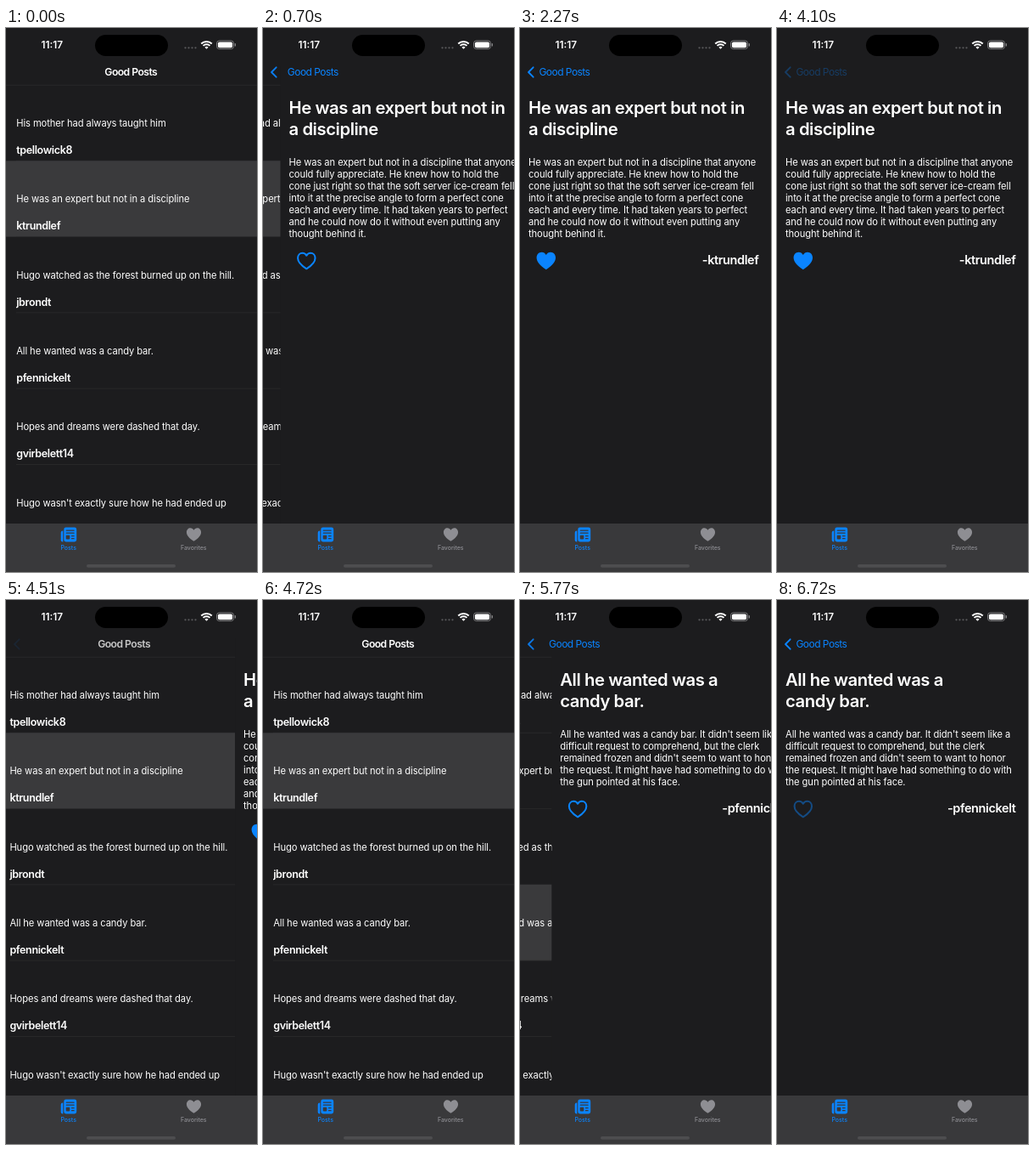
An HTML page that plays this animation: 296 by 640 pixels, repeating every 8000 ms.

```html
<!DOCTYPE html>
<html lang="en">
<head>
<meta charset="utf-8">
<title>Good Posts</title>
<style>
  html, body { margin: 0; width: 100%; height: 100%; overflow: hidden; background: #1c1c1e; }
  svg { display: block; width: 296px; height: 640px; }
  text { font-family: Inter, "Open Sans", sans-serif; fill: #fff; white-space: pre; }
  .body { font-size: 11.2px; letter-spacing: -.088px; }
  .user { font-size: 12.5px; font-weight: 600; letter-spacing: -.35px; }
  .bar { font-size: 12.2px; font-weight: 600; letter-spacing: -.55px; }
  .back { font-size: 12px; letter-spacing: -.53px; fill: #0a84ff; }
  .title { font-size: 20.3px; font-weight: 600; letter-spacing: -.44px; }
  .author { font-size: 14.5px; font-weight: 600; letter-spacing: -.4px; }
  .clock { font-size: 11.8px; font-weight: 600; }
  .tab { font-size: 7px; font-weight: 500; text-anchor: middle; }
  .line { stroke: #2b2b2d; stroke-width: .8; }
</style>
</head>
<body>
<svg id="stage" viewBox="0 0 296 640"></svg>
<script>
const LOOP = 8000, W = 296, BLUE = '#0a84ff', BG = '#1c1c1e', GRAY = '#8e8e93';
const ROW_TOP = 67, ROW_H = 89.3;

// The screen is refreshed only at these times.
const TICKS = [0, 500, 600, 700, 810, 910, 2160, 2270, 4100, 4400, 4510, 4610, 4720,
  5540, 5660, 5770, 5880, 5990, 6720];

const posts = [
  ['His mother had always taught him', 'tpellowick8'],
  ['He was an expert but not in a discipline', 'ktrundlef'],
  ['Hugo watched as the forest burned up on the hill.', 'jbrondt'],
  ['All he wanted was a candy bar.', 'pfennickelt'],
  ['Hopes and dreams were dashed that day.', 'gvirbelett14'],
  ["Hugo wasn't exactly sure how he had ended up", '']
];

const details = [
  {
    title: ['He was an expert but not in', 'a discipline'],
    body: ['He was an expert but not in a discipline that anyone',
      'could fully appreciate. He knew how to hold the',
      'cone just right so that the soft server ice-cream fell',
      'into it at the precise angle to form a perfect cone',
      'each and every time. It had taken years to perfect',
      'and he could now do it without even putting any',
      'thought behind it.'],
    author: posts[1][1]
  },
  {
    title: ['All he wanted was a', 'candy bar.'],
    body: ["All he wanted was a candy bar. It didn't seem like a",
      'difficult request to comprehend, but the clerk',
      "remained frozen and didn't seem to want to honor",
      'the request. It might have had something to do with',
      'the gun pointed at his face.'],
    author: posts[3][1]
  }
];

const HEART = 'M0 10C-7 5.5-11 1-11-3.6C-11-7.3-8.4-10-5.2-10C-3-10-1-8.8 0-6.8' +
  'C1-8.8 3-10 5.2-10C8.4-10 11-7.3 11-3.6C11 1 7 5.5 0 10Z';

const text = (x, y, cls, s, attrs = '') => `<text x="${x}" y="${y}" class="${cls}" ${attrs}>${s}</text>`;
const rect = (x, y, w, h, fill, r = 0, attrs = '') =>
  `<rect x="${x}" y="${y}" width="${w}" height="${h}" fill="${fill}" rx="${r}" ${attrs}/>`;
const lines = (list, x, y, step, cls) => list.map((s, i) => text(x, y + i * step, cls, s)).join('');
const heart = (x, y, scale, attrs) => `<path d="${HEART}" transform="translate(${x} ${y}) scale(${scale})" ${attrs}/>`;
const rule = (x, y) => `<path class="line" d="M${x} ${y}H${W}"/>`;

function arc(r, width) {
  const d = r * Math.SQRT1_2;
  return `<path d="M${236.5 - d} ${24.8 - d}A${r} ${r} 0 0 1 ${236.5 + d} ${24.8 - d}" fill="none" stroke="#fff" stroke-width="${width}"/>`;
}

function row([line, user], i) {
  const y = ROW_TOP + i * ROW_H;
  return rect(0, y, W, ROW_H, '#3a3a3c', 0, `id="row${i}"`) + rule(12, y + ROW_H) +
    text(12.2, y + 49, 'body', line) + text(12.2, y + 81, 'user', user);
}

function detail({ title, body, author }, i) {
  const y = 176 + body.length * 14;
  return `<g id="page${i}">` + lines(title, 10, 101, 24.7, 'title') + lines(body, 10, 162, 14, 'body') +
    heart(30.8, y, .93, `id="open${i}" fill="none" stroke="${BLUE}" stroke-width="2.2" stroke-linejoin="round"`) +
    heart(30.8, y, 1.02, `id="full${i}" fill="${BLUE}"`) +
    text(281.5, y + 4, 'author', '-' + author, `id="author${i}" text-anchor="end"`) + '</g>';
}

const status = text(41.6, 24.3, 'clock', '11:17') + rect(105, 8, 86, 25, '#000', 12.5) +
  [211.5, 215.5, 219.5, 223.5].map(x => `<circle cx="${x}" cy="23.3" r="1.15" fill="#58585a"/>`).join('') +
  arc(8.8, 2) + arc(5.6, 1.9) + '<path d="M236.5 24.8l-2.1-2.1a3 3 0 0 1 4.2 0z" fill="#fff"/>' +
  rect(248.5, 15, 20, 9.6, 'none', 3, 'stroke="#858587" stroke-width=".9"') +
  rect(249.9, 16.4, 17.2, 6.8, '#fff', 1.9) + rect(269.7, 18, 1.3, 3.6, '#858587', .6);

const newspaper = rect(68.3, 587.5, 14.9, 17, BLUE, 2.4) +
  `<path d="M67.3 591.5v13h-.4a2.2 2.2 0 0 1-2.2-2.2v-8.6a2.2 2.2 0 0 1 2.2-2.2z" fill="${BLUE}"/>` +
  [[70.7, 590.6, 10], [70.7, 593.5, 10], [76.9, 597, 3.8], [76.9, 600, 3.8]]
    .map(([x, y, w]) => rect(x, y, w, 1.2, '#39393b', .5)).join('') +
  rect(70.7, 596.8, 4.6, 4.6, '#39393b', .8);

const tabs = rect(0, 583, W, 57, '#39393b') + newspaper + heart(221.5, 596, .78, `fill="${GRAY}"`) +
  text(73.7, 614, 'tab', 'Posts', `style="fill:${BLUE}"`) +
  text(221.3, 614, 'tab', 'Favorites', `style="fill:${GRAY}"`) + rect(95, 631, 105, 3.7, '#4d4d4f', 1.8);

document.getElementById('stage').innerHTML = rect(0, 0, W, 640, BG) +
  `<g id="list">${rule(0, 67.3)}${posts.map(row).join('')}</g>` +
  `<g id="detail">${rect(0, 45, W, 538, BG)}${details.map(detail).join('')}</g>` +
  text(116.3, 56.3, 'bar', 'Good Posts', 'id="heading"') +
  `<g id="back"><path id="chevron" d="M15.6 46.3L10 52L15.6 57.7" fill="none" stroke="${BLUE}" stroke-width="1.9" stroke-linecap="round" stroke-linejoin="round"/>` +
  text(22.4, 56.3, 'back', 'Good Posts', 'id="label"') + '</g>' + status + tabs;

const el = id => document.getElementById(id);
const clamp = v => Math.max(0, Math.min(1, v));
const move = (id, x) => el(id).setAttribute('transform', `translate(${x.toFixed(2)} 0)`);
const fade = (id, v) => el(id).setAttribute('opacity', +clamp(v).toFixed(3));

// Critically damped spring from 1 to 0.
function spring(ms) {
  const u = Math.max(0, ms) * .01826, v = (1 + u) * Math.exp(-u);
  return v < .005 ? 0 : v;
}

// 1: list showing, 0: detail showing.
function slide(t) {
  if (t < 4288) return spring(t - 462);
  return t < 5573 ? 1 - spring(t - 4288) : spring(t - 5573);
}

function draw(time) {
  const t = TICKS.findLast(s => s <= time), p = slide(t), second = t >= 5540;
  move('list', -.3 * W * (1 - p));
  move('detail', W * p);
  move('heading', -93 * (1 - p));
  move('label', 93 * p);
  fade('heading', (p - .65) / .35);
  fade('label', 1.2 - 1.6 * p);
  fade('chevron', 1 - p);
  fade('back', t === 4100 ? .3 : 1);

  posts.forEach((_, i) => fade('row' + i, (i === 1 && t < 5660) || (i === 3 && second) ? 1 : 0));
  fade('page0', second ? 0 : 1);
  fade('page1', second ? 1 : 0);
  fade('author0', t >= 810 ? 1 : 0);
  fade('open0', t < 2160 ? 1 : t < 2270 ? .45 : 0);
  fade('full0', t >= 2270 ? 1 : 0);
  fade('open1', t >= 6720 ? .45 : 1);
  fade('full1', 0);
}

const start = performance.now();
function frame() {
  draw((performance.now() - start) % LOOP);
  requestAnimationFrame(frame);
}
draw(0);
requestAnimationFrame(frame);
</script>
</body>
</html>
```
